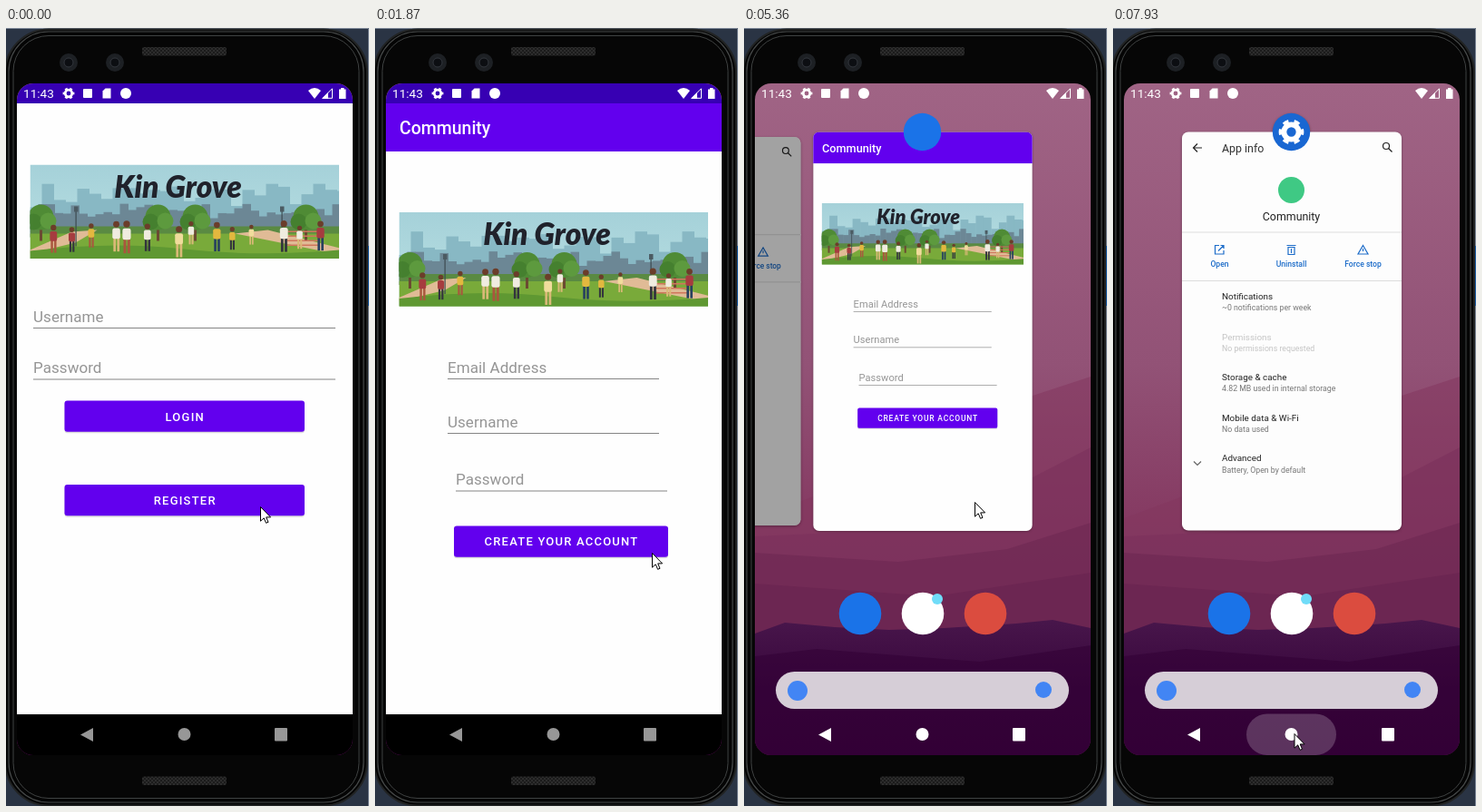
An HTML page that plays this animation: 400x857 px, repeating every 8000 ms.

```html
<!DOCTYPE html>
<html lang="en">
<head>
<meta charset="utf-8">
<title>Phone demo</title>
<style>
html, body { margin: 0; width: 100%; height: 100%; overflow: hidden; background: #2a3444; }
svg { display: block; width: 400px; height: 857px; font-family: Roboto, sans-serif; }
.hint { font-size: 17px; letter-spacing: .05px; fill: #959595; }
.btn { font-size: 13px; font-weight: 500; letter-spacing: 1.22px; fill: #fff; text-anchor: middle; }
.title { font-size: 19.5px; font-weight: 500; fill: #fff; }
.brand { font: italic 900 33.5px Lato, sans-serif; fill: #20222b; text-anchor: middle; }
.mid { text-anchor: middle; }
.act { font-size: 8.6px; font-weight: 500; fill: #1c6cc9; text-anchor: middle; }
.item { font-size: 9.9px; fill: #222; }
.note { font-size: 8.75px; fill: #777; }
.off { fill: #c4c4c4; }
.line { fill: none; stroke-width: 1.2; }
#info, #app { filter: drop-shadow(0 1px 1.5px #0005); }
</style>
</head>
<body>
<svg viewBox="0 0 400 857">
  <defs>
    <clipPath id="screen"><rect x="12" y="61" width="370" height="740" rx="18"/></clipPath>
    <clipPath id="appClip"><rect id="appBox" x="12" width="370"/></clipPath>
    <clipPath id="regClip"><rect x="64.5" y="503" width="264.5" height="34.5" rx="3"/></clipPath>
    <clipPath id="bannerClip"><rect width="340.5" height="103.5"/></clipPath>
    <linearGradient id="wall" x2="0" y2="1">
      <stop offset="0" stop-color="#a06485"/>
      <stop offset=".42" stop-color="#925276"/>
      <stop offset=".65" stop-color="#853a62"/>
      <stop offset="1" stop-color="#6c2450"/>
    </linearGradient>
    <linearGradient id="hill" x2="0" y2="1">
      <stop offset="0" stop-color="#48164b"/>
      <stop offset=".5" stop-color="#38063c"/>
      <stop offset="1" stop-color="#330036"/>
    </linearGradient>
    <linearGradient id="sky" x2="0" y2="1">
      <stop offset="0" stop-color="#a5d1d9"/>
      <stop offset=".7" stop-color="#b4dce0"/>
    </linearGradient>
    <pattern id="mesh" width="4" height="4" patternUnits="userSpaceOnUse">
      <rect width="4" height="4" fill="#1b1b1b"/><circle cx="1" cy="1" r=".9" fill="#353535"/><circle cx="3" cy="3" r=".9" fill="#353535"/>
    </pattern>
    <g id="banner" clip-path="url(#bannerClip)"></g>
  </defs>

  <g id="phone">
    <rect width="400" height="857" fill="#2a3444"/>
    <path d="M0 .5H399.500V857" fill="none" stroke="#7d8796"/>
    <rect x="398" y="240" width="2" height="66" fill="#1c5fa8"/>
    <rect x="-1" y="1.500" width="399" height="855" rx="48" fill="#050505" stroke="#222424" stroke-width="2"/>
    <rect x="3" y="4" width="391" height="849" rx="44" fill="none" stroke="#474a4a" stroke-width="1.200"/>
    <rect x="8" y="8.500" width="381" height="840" rx="39" fill="#060606" stroke="#3f4242"/>
    <rect x="150" y="21" width="93" height="9.500" rx="2" fill="url(#mesh)"/>
    <rect x="150" y="824.500" width="93" height="9.500" rx="2" fill="url(#mesh)"/>
    <g fill="#1d2024"><circle cx="69" cy="38" r="10"/><circle cx="120" cy="38" r="10"/></g>
    <g fill="#0c0e12" stroke="#33373d"><circle cx="69" cy="38" r="5"/><circle cx="120" cy="38" r="5"/></g>
  </g>

  <g clip-path="url(#screen)">
    <g id="home">
      <rect x="12" y="61" width="370" height="740" fill="url(#wall)"/>
      <path d="M12 540L200 470 318 405 382 384V700H12Z" fill="#84385f" opacity=".55"/>
      <path d="M12 560L230 550 318 495 382 462V700H12Z" fill="#7b305b" opacity=".55"/>
      <path d="M12 578L170 588 290 574 382 545V700H12Z" fill="#6f2854" opacity=".65"/>
      <path d="M12 612L210 626 382 600V700H12Z" fill="#6a2450" opacity=".7"/>
      <path d="M12 667L45 655 100 660 160 663 220 661 300 656 340 652 382 661V801H12Z" fill="url(#hill)"/>
      <path d="M12 692L80 684 260 698 382 680V801H12Z" fill="#330036" opacity=".6"/>
      <circle cx="128" cy="645" r="23.300" fill="#1a73e8"/>
      <circle cx="197" cy="645" r="23.300" fill="#fff"/>
      <circle cx="213" cy="629" r="6" fill="#70dcf8"/>
      <circle cx="266" cy="645" r="23.300" fill="#db4c3f"/>
      <rect x="35" y="709" width="323" height="41" rx="20.500" fill="#d6ced7"/>
      <circle cx="59" cy="730" r="11" fill="#4285f4"/>
      <circle cx="330" cy="729" r="9" fill="#4285f4"/>
    </g>

    <g id="info"></g>

    <g id="drag">
      <g id="app"><g clip-path="url(#appClip)">
        <rect x="12" y="61" width="370" height="22" fill="#3700b3"/>
        <rect x="12" y="83" width="370" height="673" fill="#fefefe"/>
        <rect x="12" y="756" width="370" height="45"/>
        <rect x="12" y="83" width="370" height="53" fill="#6200ee"/>
        <text class="title" x="27" y="117">Community</text>
        <use href="#banner" x="26.5" y="203"/>
        <g id="signup"></g>
      </g></g>
      <circle id="appIcon" cx="196.500" cy="114.500" r="20.700" fill="#1a73e8"/>
    </g>

    <rect id="dimAll" x="12" y="83" width="370" height="673"/>
    <rect id="dimRight" y="61" width="120" height="695"/>
    <g id="login">
      <rect x="12" y="83" width="370" height="673" fill="#fefefe"/>
      <use href="#banner" x="26.5" y="150.500"/>
    </g>
    <rect id="tap" y="755.500" width="99" height="45.500" rx="22.700" fill="#fff"/>
  </g>

  <g id="status" fill="#fff"></g>
  <g id="nav">
    <path d="M82 778.500L96 771V786Z"/>
    <circle cx="196.500" cy="778" r="7"/>
    <rect x="296" y="771" width="14" height="14.500" rx="1"/>
  </g>
  <path id="cursor" d="M.5 .5V16.200L4.200 12.800 6.600 18.300 9 17.300 6.700 11.900H11.600Z" fill="#fff" stroke="#000"/>
</svg>

<script>
const $ = id => document.getElementById(id);
const add = (id, s) => $(id).insertAdjacentHTML('beforeend', s);
const box = (x, y, w, h, fill, rx = 0) => `<rect x="${x}" y="${y}" width="${w}" height="${h}" rx="${rx}" fill="${fill}"/>`;
const disc = (x, y, r, fill) => `<circle cx="${x}" cy="${y}" r="${r}" fill="${fill}"/>`;
const text = (x, y, s, cls, style = '') => `<text x="${x}" y="${y}" class="${cls}" style="${style}">${s}</text>`;
const field = (x, y, w, s) => text(x, y - 6.700, s, 'hint') + box(x, y - .5, w, 1, '#858585');
const button = (x, y, w, s) => box(x, y + 1.500, w, 34.300, '#0002', 3) + box(x, y, w, 34.300, '#6200ee', 3) +
  text(x + w / 2 + .5, y + 22, s, 'btn');
const gear = (x, y, r, c) => `<g fill="none" stroke="${c}" transform="translate(${x} ${y})">` +
  `<circle r="${r * .58}" stroke-width="${r * .42}"/>` +
  `<circle r="${r * .84}" stroke-width="${r * .3}" pathLength="12" stroke-dasharray="1" stroke-dashoffset=".5"/></g>`;
const repeat = (n, f) => Array.from({ length: n }, (_, i) => f(i)).join('');

// Park banner
let seed = 7;
const rnd = (lo, hi) => lo + (hi - lo) * (seed = seed * 16807 % 2147483647) / 2147483647;
const pick = list => list[Math.floor(rnd(0, list.length))];
const skyline = (w, base, lo, hi, fill) => repeat(Math.ceil(341 / w), i => {
  const h = rnd(lo, hi);
  return box(i * w, base - h, w + .5, h, fill);
});
const tree = x => box(x - 1.500, 60, 3, 24, '#6b4a32') + disc(x, 58, 14, '#4f8b35') +
  disc(x - 8, 63, 9, '#45802f') + disc(x + 8, 62, 9, '#5d9a3e');
const lamp = x => box(x, 50, 1.200, 40, '#3c4a50') + box(x - 1.500, 46, 4.500, 6, '#4b5b62');
const person = i => {
  const legs = pick(['#27405f', '#a9573d', '#33343d', '#d9b977']);
  return `<g transform="translate(${20 + i * 23 + rnd(-8, 8)} ${rnd(65, 72)}) scale(${rnd(.7, 1.150)})">` +
    box(-3, 13, 2.500, 15, legs) + box(.8, 13, 2.500, 15, legs) +
    box(-4, 4, 8, 11, pick(['#f0ece0', '#e3b83f', '#a63c3f', '#f0dc9c']), 2) + disc(0, 0, 3.200, '#6b3d2a') + '</g>';
};
add('banner', box(0, 0, 341, 104, 'url(#sky)') +
  skyline(13, 75, 28, 56, '#88b8c4') + skyline(9, 80, 20, 38, '#6c8795') +
  box(0, 68, 341, 12, '#5a8a42') + box(0, 76, 341, 28, '#79aa3a') +
  '<path d="M0 94L46 74 74 72 50 86 0 98ZM226 76L262 72 341 92V99Z" fill="#e0bb96"/>' +
  '<path d="M0 95Q90 84 170 93T341 94V104H0Z" fill="#5f9832"/>' +
  [12, 141, 182, 304].map(tree).join('') + lamp(50) + lamp(277) +
  repeat(4, i => box(283, 73 + i * 5, 36, 1.500, '#d0765c')) +
  repeat(14, person) + text(163, 36, 'Kin Grove', 'brand'));

add('login', field(30, 330.500, 333, 'Username') + field(30, 387, 333, 'Password') +
  button(64.500, 410.500, 264.500, 'LOGIN') + button(64.500, 503, 264.500, 'REGISTER') +
  '<circle id="press" cx="282" cy="529" fill="#fff" opacity=".24" clip-path="url(#regClip)"/>');
add('signup', field(80, 386.500, 233, 'Email Address') + field(80, 446.500, 233, 'Username') +
  field(89, 510, 233, 'Password') + button(87, 548.500, 236, 'CREATE YOUR ACCOUNT'));

// App info card
const rows = [
  ['Notifications', '~0 notifications per week'], ['Permissions', 'No permissions requested', 'off'],
  ['Storage &amp; cache', '4.82 MB used in internal storage'], ['Mobile data &amp; Wi-Fi', 'No data used'],
  ['Advanced', 'Battery, Open by default']
];
add('info', box(76, 114.500, 242, 439, '#fdfdfd', 7) +
  '<g class="line" stroke="#222"><path d="M98 132H89M93 127.500L88.500 132 93 136.500"/>' +
  '<circle cx="301" cy="130" r="3.500"/><path d="M303.500 132.500L307.500 136.500"/><path d="M89 477.500L93 481.500 97 477.500" stroke="#666"/></g>' +
  text(120, 136.500, 'App info', '', 'font-size:12.4px;fill:#333') +
  disc(196.500, 178.500, 14.500, '#3fc984') + text(196.500, 212, 'Community', 'mid', 'font-size:12.4px;fill:#222') +
  box(76, 224.500, 242, 1, '#ddd') + box(76, 278, 242, 1, '#ddd') +
  '<g class="line" stroke="#1c6cc9"><path d="M117 239.500H112.500V249H122V245M118.500 239.500H122V243M122 239.500L116 245.500"/>' +
  '<path d="M193 241.500H200V249.500H193ZM191.500 239.500H201.500M196.500 243V248"/>' +
  '<path d="M275.500 239.500L281 249H270ZM275.500 243V246"/></g>' +
  ['Open', 'Uninstall', 'Force stop'].map((s, i) => text(117.500 + 79 * i, 263, s, 'act')).join('') +
  rows.map(([name, note, cls = ''], i) => text(120, 299 + 44.600 * i, name, 'item ' + cls) +
    text(120, 311.200 + 44.600 * i, note, 'note ' + cls)).join('') +
  disc(196.500, 114.500, 20.700, '#1967d2') + gear(196.500, 114.500, 14, '#fff') +
  '<rect id="shade" x="76" y="114.500" width="242" height="439" rx="7"/>');

add('status', text(19, 77, '11:43', '', 'font-size:13.6px') + gear(69, 72, 6.500, '#fff') +
  box(85, 67, 10, 10, '#fff', 1) +
  '<path d="M109.500 66.500H115.500V77.500H106.500V69.500Z"/>' + disc(132, 72, 6, '#fff') +
  '<path d="M333 69Q340 63 347 69L340 78Z"/><path d="M349 77.300H359.500V66.800Z" fill="none" stroke="#fff"/><path d="M348 78L355 71V78Z"/>' +
  '<path d="M367 67.500H369V66H372.500V67.500H374.500V78H367Z"/>');

// Progress from 0 to 1 in hard steps of about 140 ms
const steps = (t, from, to) => {
  const n = Math.round((to - from) / 140);
  return Math.min(1, Math.max(0, Math.floor(n * (t - from) / (to - from) + 1e-6) / n));
};
const pulse = p => .4 * Math.min(p, 1 - p);
const set = (id, attrs) => { for (const k in attrs) $(id).setAttribute(k, attrs[k]); };
const move = (x, y) => `translate(${x} ${y})`;

// Pointer strokes: start, end, x, y
const strokes = [
  [1360, 1630, 305, 578], [2290, 2420, 320, 633], [2420, 2690, 196, 647], [2830, 3090, 129, 700],
  [3090, 3220, 189, 721], [3220, 3370, 101, 775], [3370, 3920, 301, 787], [4510, 4790, 275, 628],
  [4790, 5360, 254, 522], [5770, 6080, 224.500, 98], [6230, 6650, 211, 651], [6950, 7090, 214, 591],
  [7090, 7510, 199.500, 777]
];
const pointer = t => strokes.reduce(([x, y], [from, to, x2, y2]) => {
  const p = steps(t, from, to), e = p * (2 - p);
  return [x + (x2 - x) * e, y + (y2 - y) * e];
}, [280, 527]);

function draw() {
  const t = performance.now() % 8000;
  set('cursor', { transform: move(...pointer(t)) });
  set('press', { r: t < 1480 ? 240 * steps(t, 850, 1210) : 0 });

  // Login slides out over the sign-up screen
  const out = steps(t, 1230, 1870);
  const fade = Math.max(0, 1 - 1.210 * out * out);
  set('login', { transform: move(-81 * out, 0), opacity: fade });
  set('dimAll', { opacity: .5 * (1 - out) });
  set('dimRight', { x: 382 - 81 * out, opacity: fade });

  // App shrinks to a card
  const zoom = steps(t, 4650, 5210);
  const k = 1 / (1 + Math.exp(-25.700 * (zoom - .405)));
  const s = 1 - .347 * k;
  const small = zoom > .3;
  set('app', { transform: `${move(197 * (1 - s), 83 * (1 - s) + 31.500 * k)} scale(${s})` });
  set('appBox', { y: small ? 83 : 61, height: small ? 673 : 740, rx: small ? 10 : 18 });
  set('appIcon', { opacity: Math.max(0, 2 * zoom - 1) });

  // Card is swiped away and the next one moves in
  const swipe = steps(t, 5770, 6230);
  const rest = (1 - swipe) ** 1.300;
  set('drag', { transform: move(0, -603 * swipe), opacity: Math.max(0, 1 - .870 * swipe) });
  set('info', {
    transform: `${move(197 - 252.500 * rest, 334)} scale(${1 - .025 * rest * rest}) ${move(-197, -334)}`,
    visibility: t < 5360 ? 'hidden' : 'visible'
  });
  set('shade', { opacity: .36 * rest ** 1.500 });

  // Navigation bar
  const late = t > 6000;
  set('tap', { x: late ? 147 : 253.500, opacity: pulse(late ? steps(t, 7650, 8210) : steps(t, 4090, 4650)) });
  set('nav', { fill: t < 4370 ? '#979797' : '#fff' });
  requestAnimationFrame(draw);
}
draw();
</script>
</body>
</html>
```
